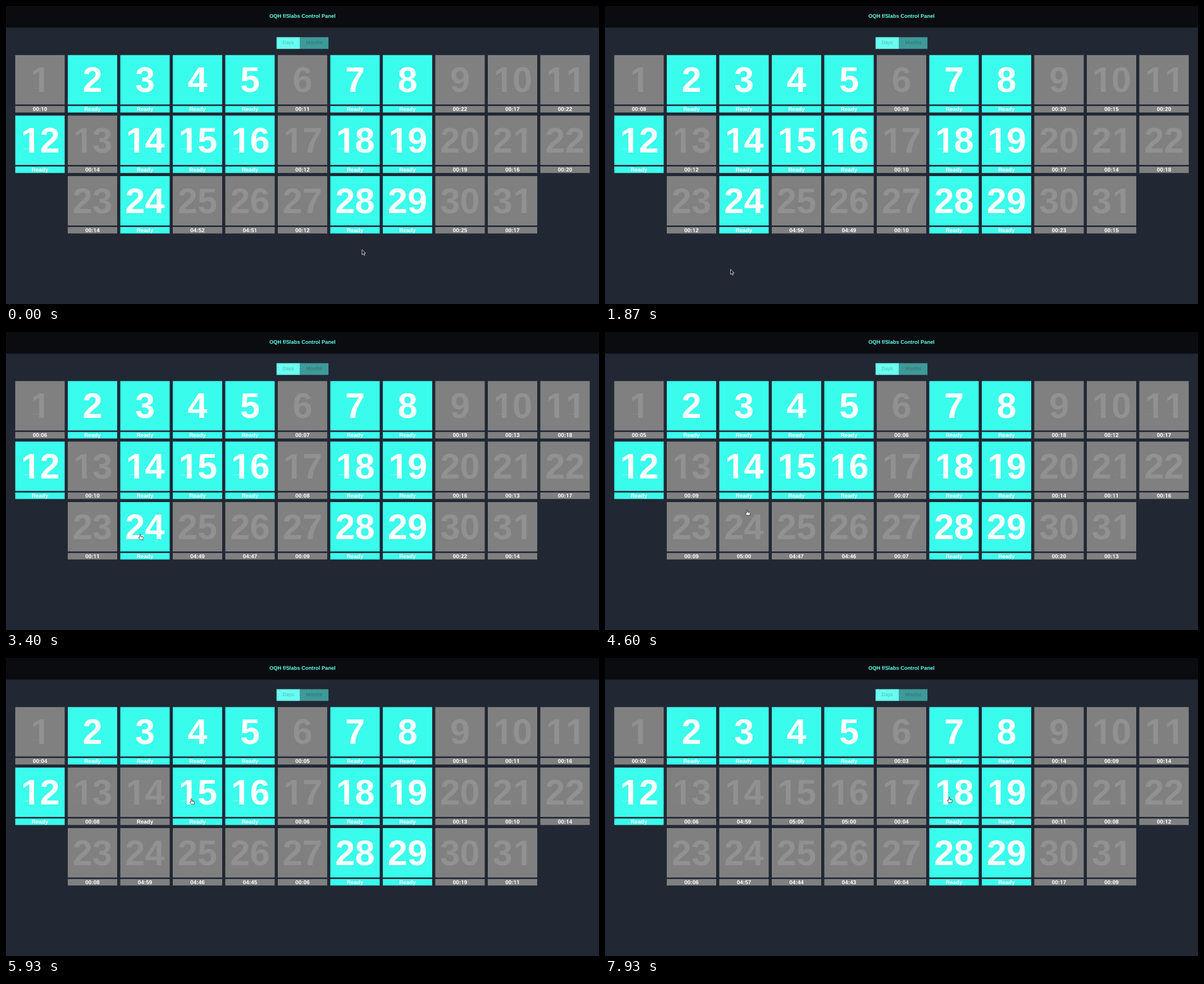
Write an HTML page that moves like this. It is 1056 px wide and 531 px high and loops after 8000 ms.

```html
<!DOCTYPE html>
<html lang="en">
<head>
<meta charset="utf-8">
<title>Control Panel</title>
<style>
  html, body { margin: 0; width: 100%; height: 100%; overflow: hidden; background: #212733; }
  /* A 1920 px wide page, shown at 55 % */
  #page {
    position: absolute; left: 0; top: 0; width: 1920px; height: 965px;
    transform: scale(.55); transform-origin: 0 0;
    font-family: "Liberation Sans", Arial, sans-serif;
    text-align: center; text-rendering: geometricPrecision;
  }
  header { height: 70px; line-height: 68px; font-size: 17px; font-weight: bold; background: #0b0c0f; color: #5ffff0; }
  nav { display: flex; justify-content: center; margin: 31px 0 20px; font-size: 16px; line-height: 38px; }
  nav div { padding: 0 20px; background: #3e9a99; color: #307170; }
  nav .on { background: #68fff1; color: #4eb7ad; }
  #grid { display: flex; flex-wrap: wrap; justify-content: center; gap: 10px; padding: 0 30px; }
  .cell { width: 160px; font-weight: bold; color: #fff; --bg: #3afcec; }
  .cell b { display: block; height: 160px; font-size: 115px; line-height: 160px; background: var(--bg); }
  .cell span { display: block; margin-top: 5px; height: 21px; font-size: 18px; line-height: 21px; background: var(--bg); }
  .off { --bg: #808080; }
  .off b { color: #919191; }
  /* The digit 1 without its foot */
  i {
    display: inline-block; position: relative; left: .023em; font-style: normal; line-height: 1;
    clip-path: polygon(0 0, .371em 0, .371em 1em, .233em 1em, .233em .74em, 0 .74em);
  }
  #cursor { position: absolute; left: 0; top: 0; width: 14px; height: 16px; overflow: visible; }
</style>
</head>
<body>
<div id="page">
  <header>OQH f/Slabs Control Panel</header>
  <nav><div class="on">Days</div><div>Months</div></nav>
  <div id="grid"></div>
</div>
<svg id="cursor">
  <path id="arrow" d="M0 0V9.2L2.1 7.3L3.5 10.4L5 9.7L3.6 6.7H6.4Z"
    fill="#16181d" stroke="#eee" stroke-width=".8" stroke-linejoin="round"/>
  <path id="hand" d="M-.8 .2Q0-.7 .8 .2V3.4L4.6 4.2Q5.7 4.6 5.5 6L4.7 9.6H-.6L-3 6.2Q-3.2 4.9-2 5.1L-.8 6ZM1.9 3.8V5.2M3.4 4.1V5.4"
    fill="#fff" stroke="#111" stroke-width=".7" stroke-linejoin="round"/>
</svg>
<script>
const LOOP = 8, FPS = 15, SCALE = .55;
const COOLDOWN = 300, DELAY = 1.6;

// All times in seconds: when a running countdown ends, when a ready cell is clicked
const ends = {
  1: 10.13, 6: 11.13, 9: 22.78, 10: 17.13, 11: 22.05, 13: 14.13, 17: 12.05, 20: 19.5,
  21: 16.5, 22: 20.78, 23: 14.4, 25: 292.5, 26: 291.13, 27: 12.5, 30: 25.5, 31: 17.78
};
const clicks = { 24: 3.8, 14: 5.45, 15: 6.62, 16: 7.3 };
for (const n in clicks) ends[n] = clicks[n] + COOLDOWN + DELAY;

// Pointer key points: time, x, y
const path = [
  [0, 634, 434], [1.07, 285, 453], [2.6, 167, 484], [3.5, 248, 345], [3.8, 248, 345],
  [4.6, 253, 317], [5.1, 262, 252], [5.93, 330, 251], [7.2, 423, 249], [LOOP, 630, 248]
];

const $ = id => document.getElementById(id);
const digits = text => String(text).replace(/1/g, "<i>1</i>");
const pad = v => String(v).padStart(2, "0");

const cells = Array.from({ length: 31 }, (_, k) => {
  const el = document.createElement("div");
  el.className = "cell";
  el.innerHTML = `<b>${digits(k + 1)}</b><span></span>`;
  $("grid").append(el);
  return { n: k + 1, el, label: el.lastChild };
});

function status(n, t) {
  const left = Math.floor(ends[n] - t);
  return left <= COOLDOWN ? pad(Math.floor(left / 60)) + ":" + pad(left % 60) : "Ready";
}

const isOff = (n, t) => n in ends && t >= (clicks[n] || 0);

function pointer(t) {
  const i = path.findIndex(p => p[0] > t);
  const [t0, x0, y0] = path[i - 1], [t1, x1, y1] = path[i];
  const k = (t - t0) / (t1 - t0);
  return [x0 + (x1 - x0) * k, y0 + (y1 - y0) * k];
}

function isOver({ el }, x, y) {
  const dx = x / SCALE - el.offsetLeft, dy = y / SCALE - el.offsetTop;
  return dx > 0 && dx < 160 && dy > 0 && dy < 160;
}

function draw(now) {
  const frame = Math.floor((now + 4) * FPS / 1000) % (LOOP * FPS);
  const t = frame / FPS;
  for (const c of cells) {
    c.el.classList.toggle("off", isOff(c.n, t));
    const text = status(c.n, t);
    if (c.text !== text) c.label.innerHTML = digits(c.text = text);
  }
  const [x, y] = pointer(t);
  const over = cells.some(c => isOver(c, x, y));
  $("arrow").style.display = over ? "none" : "";
  $("hand").style.display = over ? "" : "none";
  $("cursor").style.transform = `translate(${x}px,${y}px)`;
}

function tick() {
  draw(performance.now());
  requestAnimationFrame(tick);
}
tick();
</script>
</body>
</html>
```
